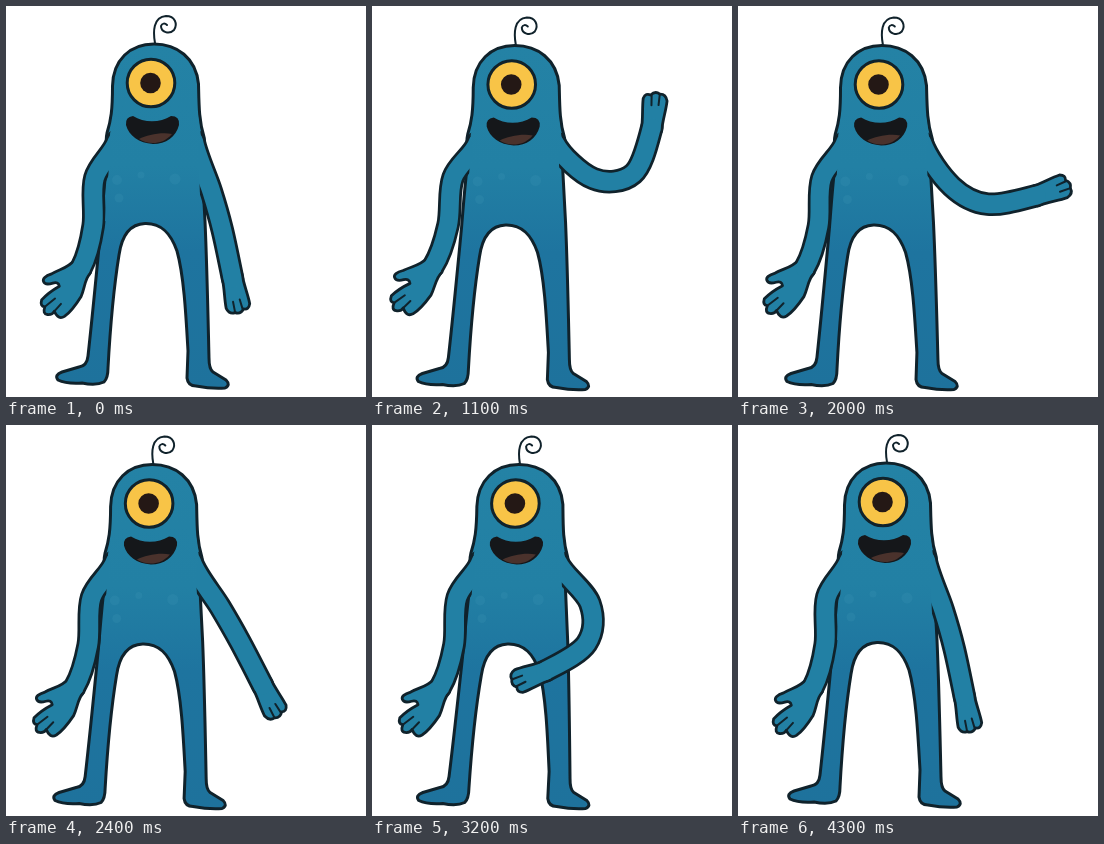
These frames come from a looping animation (360 by 391 pixels, 4400 ms). An HTML page:

```html
<!DOCTYPE html>
<html lang="en">
<head>
<meta charset="utf-8">
<title>Waving monster</title>
<style>
  html, body { margin: 0; width: 100%; height: 100%; overflow: hidden; background: #fff; }
  svg { display: block; width: 100vw; height: 100vh; }
  path { stroke-linecap: round; stroke-linejoin: round; }
  .ink { fill: none; stroke: #10222b; stroke-width: 2; }
  .line { fill: none; stroke: #10222b; stroke-width: 23.5; }
  .skin { fill: none; stroke: #2280a4; stroke-width: 18; }
  .hand { fill: #2280a4; stroke: #10222b; stroke-width: 2.8; }
  .spot { fill: #3c93b3; opacity: .25; }
</style>
</head>
<body>
<svg viewBox="0 0 360 391">
  <defs>
    <linearGradient id="blue" gradientUnits="userSpaceOnUse" x1="0" y1="38" x2="0" y2="384">
      <stop offset="0" stop-color="#2482a5"/>
      <stop offset=".35" stop-color="#2280a4"/>
      <stop offset=".6" stop-color="#1e749f"/>
      <stop offset="1" stop-color="#1e729c"/>
    </linearGradient>
  </defs>

  <g class="torso">
    <path class="ink" d="M149 37C147 26 147 11 160 10C169 10 172 18 168 24C163 29 155 26 155 20C156 17 159 17 161 19"/>
    <path class="ink" style="fill:url(#blue);stroke-width:3" d="M148 38C124 38 107 54 106.500 80C106.500 104 105 114 101 127
      C99 135 101 146 101 155C98 180 97 195 95 220C91 262 87 305 82 350Q81 360 73 361L56 366Q48 369 52 374
      Q60 378 76 377Q90 380 98 376Q102 372 102 362C104 325 108 280 113 249C116 228 125 218 139 217.500
      C156 217 165 228 171 245C178 270 180 310 182 345L181 372Q182 380 190 380Q206 383 219 382Q225 379 220 374
      L207 366Q203 363 203 352C202 310 201 260 199 215L196 160C196 148 200 141 198 131C193 115 193 100 192.500 78
      C190 52 171 38 148 38Z"/>
  </g>

  <g id="left">
    <path class="line"/>
    <g>
      <path class="hand" d="M-3 10C10 10 14 15 24 18Q33 23 35 19Q37 15 30 11Q25 8 28 4Q40 8 50 8Q56 5 53 1
        Q60 -2 57 -6Q54 -10 50 -9Q54 -18 47 -20Q38 -22 21 -19C12 -16 6 -10 -3 -10"/>
      <path class="ink" d="M53 1L40 -1M50 -9L40 -9"/>
    </g>
    <path class="skin"/>
  </g>
  <g id="right">
    <path class="line"/>
    <g>
      <path class="hand" d="M-3 -10C10 -10 18 -12 28 -12Q34 -10 32 -5Q37 -1 34 4Q35 10 28 12C18 12 10 10 -3 10"/>
      <path class="ink" d="M32 -4L22 -3M34 4L23 4"/>
    </g>
    <path class="skin"/>
  </g>

  <g class="torso">
    <path fill="url(#blue)" d="M109 98H190L195 130Q191 150 193 165L195 215H99L103 160Q107 148 104 128Z"/>
    <circle class="spot" cx="111" cy="174" r="5"/>
    <circle class="spot" cx="113" cy="192" r="4.500"/>
    <circle class="spot" cx="169" cy="173" r="5.500"/>
    <circle class="spot" cx="135" cy="169" r="3.500"/>
    <circle cx="145" cy="77" r="23.800" fill="#f8c447" stroke="#10222b" stroke-width="3"/>
    <circle cx="144.500" cy="77" r="10.300" fill="#241815"/>
    <path fill="#15171a" d="M120 119Q119 111 127 110C138 117 154 117 165 110Q174 110 173 119C170 131 160 138 147 138C133 137 123 130 120 119Z"/>
    <path fill="#4a322c" d="M133 133C141 129 155 126 166 128C160 135 153 137 147 137Q139 137 133 133Z"/>
  </g>
</svg>
<script>
const LOOP = 4400, STEP = 100;

// The waving arm eases between these: step, upper arm angle, forearm angle
const STOPS = [
  [0, 71, 78],    // rest
  [4, 65, 152],   // across the belly
  [11, 43, -68],  // raised
  [20, 56, -10],  // held out
  [26, 59, 88],   // hanging
  [36, 49, 178],  // tucked in
  [42, 71, 78],   // rest
  [44, 71, 78]
];
const find = s => document.querySelector(s);
const torso = document.querySelectorAll(".torso");
const bump = (t, from, to) => t > from && t < to ? Math.sin(Math.PI * (t - from) / (to - from)) : 0;

// Elbow and hand follow from the two main angles
function armAngles(t) {
  const i = STOPS.findIndex(s => s[0] > t), a = STOPS[i - 1], b = STOPS[i];
  const u = (t - a[0]) / (b[0] - a[0]), ease = u * u * (3 - 2 * u);
  const [upper, fore] = [1, 2].map(n => a[n] + (b[n] - a[n]) * ease);
  const elbow = upper + (fore - upper) * .45;
  return [upper, elbow, fore, fore + (fore - elbow) * .25];
}

// Smooth curve through all points but the first and last
function spline(p) {
  let d = `M${p[1]}`;
  for (let i = 1; i < p.length - 2; i++) {
    const c1 = p[i].map((v, n) => v + (p[i + 1][n] - p[i - 1][n]) / 6);
    const c2 = p[i + 1].map((v, n) => v - (p[i + 2][n] - p[i][n]) / 6);
    d += `C${c1} ${c2} ${p[i + 1]}`;
  }
  return d;
}

function drawArm(side, x, y, lengths, angles) {
  const pts = [[x, y - 40], [x, y]];
  angles.forEach((deg, i) => {
    const r = deg * Math.PI / 180, [px, py] = pts[pts.length - 1];
    pts.push([px + lengths[i] * Math.cos(r), py + lengths[i] * Math.sin(r)]);
  });
  const d = spline(pts), g = find("#" + side);
  g.querySelector(".line").setAttribute("d", d);
  g.querySelector(".skin").setAttribute("d", d);
  g.querySelector("g").setAttribute("transform", `translate(${pts[4]}) rotate(${angles[3]})`);
}

function draw(ms) {
  const t = Math.floor(ms % LOOP / STEP);
  const active = Math.max(0, Math.min(1, t / 3, (43 - t) / 4));
  const head = -5.5 * bump(t, 0, 27) - 2 * bump(t, 27, 44) * active;
  const feet = -active * (4.5 + 1.7 * Math.cos(2 * Math.PI * (t - 7) / 30));
  const swing = 2 * active + 6.5 * bump(t, 10, 20);
  const lean = (feet - head) / 306, dy = 1.5 * active;
  torso.forEach(g => g.setAttribute("transform", `matrix(1 0 ${lean} 1 ${head - 77 * lean} ${dy})`));

  const dx = head + 58 * lean;
  drawArm("left", 111 + dx, 135 + dy, [43, 48, 44, 40], [121, 92, 106, 132].map(a => a + swing));
  drawArm("right", 188 + dx, 135 + dy, [53, 40, 50, 35], armAngles(t));
}

const start = performance.now();
function tick() {
  draw(performance.now() - start);
  requestAnimationFrame(tick);
}
tick();
</script>
</body>
</html>
```
